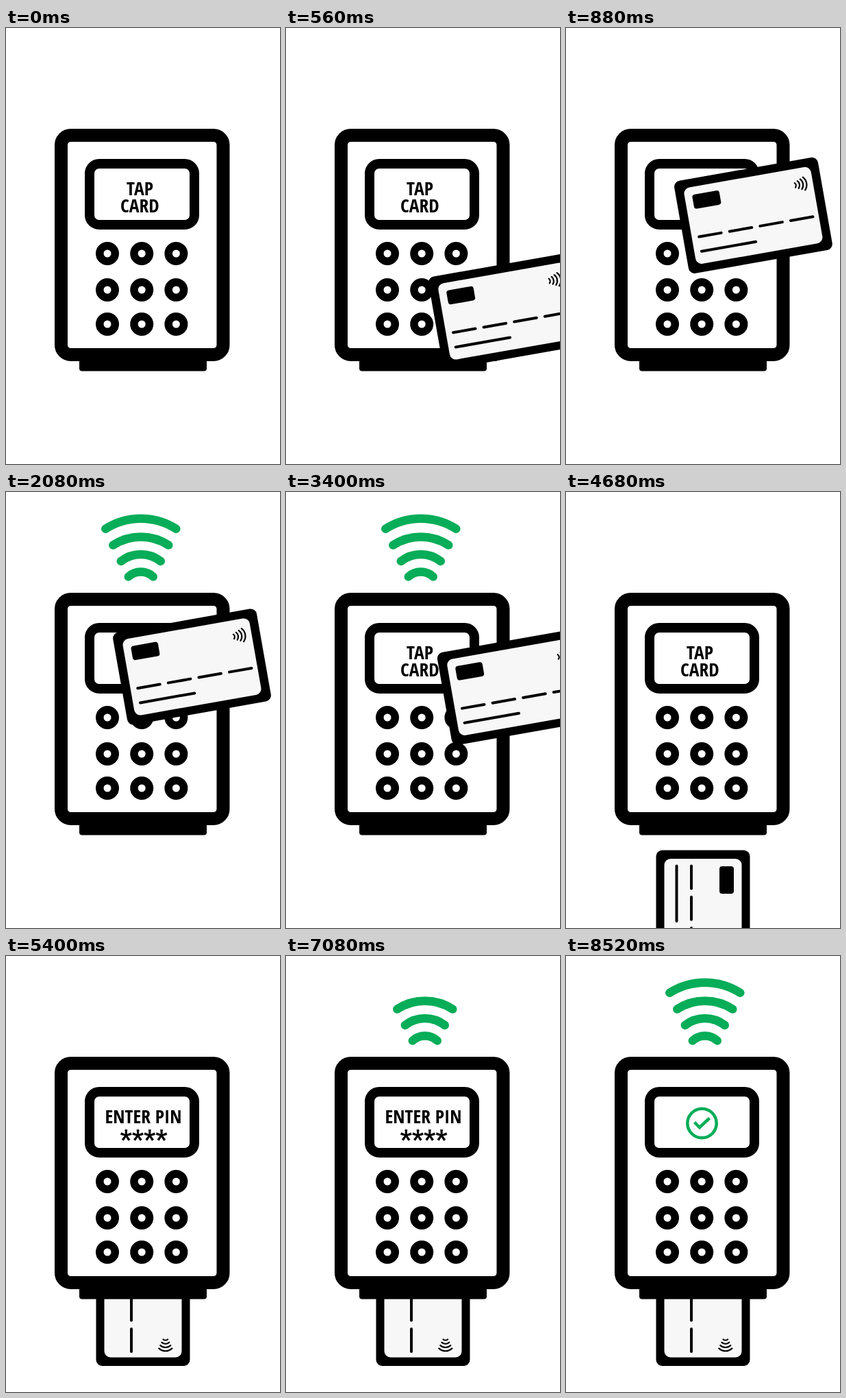
An HTML page for the animation above (10 s loop, 400 by 636 pixels).

```html
<!DOCTYPE html>
<html lang="en">
<head>
<meta charset="utf-8">
<title>Card terminal</title>
<style>
  html, body { margin: 0; width: 100%; height: 100%; overflow: hidden; background: #fff; }
  svg { display: block; width: 100vw; height: 100vh; }
  .label { font-weight: 800; font-stretch: 75%; text-anchor: middle; }
  .stars { font: 700 38px Roboto, sans-serif; text-anchor: middle; }
</style>
</head>
<body>
<svg viewBox="0 0 400 636">
  <defs>
    <g id="card">
      <rect x="-106.5" y="-68.5" width="213" height="137" rx="9"/>
      <rect x="-94" y="-56.5" width="188" height="113" rx="9" fill="#f7f7f7"/>
      <rect x="-83" y="-45" width="40" height="21" rx="4"/>
      <g id="marks" fill="none" stroke="#000" stroke-width="4" stroke-linecap="round"></g>
    </g>
  </defs>

  <g id="waves" fill="none" stroke="#07ad58" stroke-width="12.5" stroke-linecap="round"></g>

  <use id="chipCard" href="#card"/>
  <rect x="107" y="470" width="186" height="30.5" rx="4"/>
  <g id="body" fill="#fff" stroke="#000">
    <rect x="80.5" y="156.5" width="236.5" height="320" rx="14" stroke-width="19"/>
    <rect x="122" y="198" width="153" height="89" rx="14" stroke-width="14"/>
  </g>

  <g id="tap" class="label">
    <text x="195.5" y="243.5">TAP</text>
    <text x="195.3" y="268.7">CARD</text>
  </g>
  <g id="pin">
    <text id="pinText" class="label" x="200.5" y="244">ENTER PIN</text>
    <text class="stars" x="201" y="281">****</text>
  </g>
  <g id="done" fill="none" stroke="#07ad58" stroke-width="4.5">
    <circle cx="198.5" cy="244" r="21.2"/>
    <path d="M187.5 242.5L195 250L209.5 236.5"/>
  </g>

  <use id="tapCard" href="#card"/>
</svg>

<script>
const LOOP = 10000, STEP = 40;
const $ = id => document.getElementById(id);

function add(parent, tag, attrs) {
  const el = document.createElementNS('http://www.w3.org/2000/svg', tag);
  for (const k in attrs) el.setAttribute(k, attrs[k]);
  parent.appendChild(el);
  return el;
}

// Keypad
for (const cy of [329, 382, 432])
  for (const cx of [148, 198.2, 248.4])
    add($('body'), 'circle', { cx, cy, r: 11.25, 'stroke-width': 11.5 });

// Card print: number dashes, name line, contactless sign
let lines = 'M-83.5 38.5H-3';
for (let i = 0; i < 4; i++) lines += `M${-83.5 + 45.3 * i} 17h33`;
add($('marks'), 'path', { d: lines });
for (let i = 0; i < 4; i++) {
  const h = 3.3 + 2.1 * i, r = h * 1.45;
  add($('marks'), 'path', {
    d: `M${67.7 + 4.4 * i} ${-32.8 - h}a${r} ${r} 0 0 1 0 ${2 * h}`,
    'stroke-width': 2.2
  });
}

// Signal arcs from the smallest up: half chord, sag, end height
const waves = [[18, 7, 123.5], [29, 10, 101], [40.5, 12, 77.5], [51.5, 15, 53.7]].map(([half, sag, y]) => {
  const r = (half * half + sag * sag) / (2 * sag);
  return add($('waves'), 'path', { d: `M${196.8 - half} ${y}a${r} ${r} 0 0 1 ${2 * half} 0` });
});

// Use the narrowest bold face available
function pickFont() {
  const labels = document.querySelectorAll('.label');
  const setFont = (family, size) => labels.forEach(el => {
    el.style.fontFamily = `"${family}", "Open Sans", sans-serif`;
    el.style.fontSize = size + 'px';
  });
  const faces = ['Open Sans Condensed', 'Open Sans', 'Noto Sans', 'Roboto Condensed', 'Liberation Sans Narrow', 'Roboto'];
  const widths = faces.map(face => {
    setFont(face, 28);
    return $('pinText').getComputedTextLength();
  });
  const width = Math.min(...widths);
  setFont(faces[widths.indexOf(width)], Math.min(28, 28 * 112 / width));
}

const ease = (t, start, span) => {
  const u = Math.min(1, Math.max(0, (t - start) / span));
  return u * u * (3 - 2 * u);
};
const show = (el, on) => el.setAttribute('visibility', on ? 'visible' : 'hidden');

// Offset of the tilted card: curved approach, straight exit
function tapOffset(t) {
  if (t < 3120) {
    const k = ease(t, 0, 1000), a = (1 - k) * (1 - k), b = 2 * k * (1 - k);
    return [250 * a + 20 * b, 263 * a + 235 * b];
  }
  const k = ease(t, 3120, 960);
  return [315 * k, 143 * k];
}

function render(t) {
  const [dx, dy] = tapOffset(t);
  $('tapCard').setAttribute('transform', `translate(${271.5 + dx} ${255 + dy}) rotate(-10)`);
  show($('tapCard'), t < 4080);

  const drop = 335 * (1 - ease(t, 4120, 1000));
  $('chipCard').setAttribute('transform', `translate(200 ${491.5 + drop}) rotate(90)`);
  show($('chipCard'), t >= 4120);

  const second = t >= 6600;
  $('waves').setAttribute('transform', `translate(${second ? 6 : 0} 0)`);
  waves.forEach((wave, i) =>
    show(wave, second ? t >= 6600 + 240 * i : t >= 1360 + 240 * i && t < 3920));

  show($('tap'), t < 5400);
  show($('pin'), t >= 5400 && t < 8520);
  show($('done'), t >= 8520);
}

pickFont();
render(0);
let start;
requestAnimationFrame(function tick(now) {
  start ??= now;
  const t = (now - start) % LOOP;
  render(Math.floor(t / STEP) * STEP);
  requestAnimationFrame(tick);
});
</script>
</body>
</html>
```
